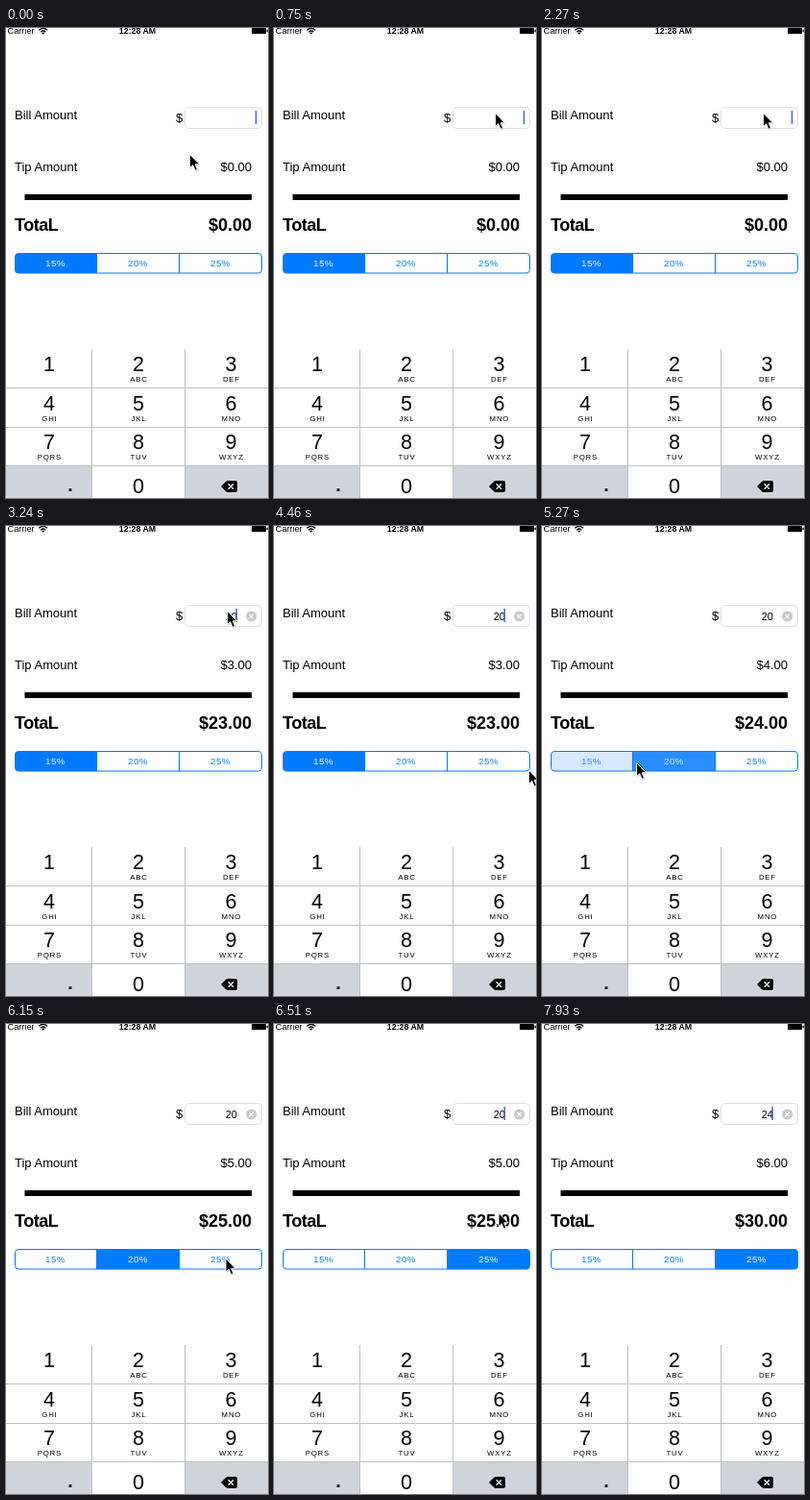
An HTML page that plays this animation: 273x489 px, repeating every 8000 ms.

```html
<!DOCTYPE html>
<html lang="en">
<head>
<meta charset="utf-8">
<title>Tip calculator</title>
<style>
html, body { margin: 0; width: 100%; height: 100%; overflow: hidden; background: #fefefe; }
svg { display: block; width: 273px; height: 489px; font-family: "Liberation Sans", Arial, sans-serif; }
.mid { text-anchor: middle; }
.end { text-anchor: end; }
.bold { font-weight: bold; }
</style>
</head>
<body>
<svg id="stage" viewBox="0 0 273 489" width="273" height="489">
  <rect width="273" height="489" fill="#fefefe"/>

  <g id="status">
    <text x="1.5" y="6.3" font-size="9.2">Carrier</text>
    <g fill="none" stroke="#000" stroke-width="1.3">
      <path d="M34.3 2.3Q38.7 -1.7 43.1 2.3"/>
      <path d="M36.2 4.2Q38.7 1.9 41.2 4.2"/>
    </g>
    <path d="M37.2 5.2Q38.7 4 40.2 5.2L38.7 6.8Z"/>
    <text class="mid bold" x="137" y="6.3" font-size="8.8">12:28 AM</text>
    <rect x="256" y="0" width="15" height="6" rx="0.8"/>
    <rect x="271.5" y="1.7" width="1.3" height="2.6"/>
  </g>

  <g font-size="13">
    <text x="9" y="95">Bill Amount</text>
    <text x="177" y="98">$</text>
    <text x="9" y="149">Tip Amount</text>
    <text id="tip" class="end" x="256" y="149"></text>
  </g>
  <rect x="186.5" y="82.5" width="80" height="22" rx="4" fill="#fff" stroke="#dedede"/>
  <text id="bill" class="end" x="241" y="97.5" font-size="11"></text>
  <rect id="caret" y="86" width="1.6" height="14" fill="#426bf2"/>
  <g id="clear">
    <circle cx="255.6" cy="94" r="5.6" fill="#c8c8cd"/>
    <path d="M253.4 91.8l4.4 4.4m0 -4.4l-4.4 4.4" stroke="#fff" stroke-width="1.1"/>
  </g>
  <rect x="19.5" y="173" width="236.5" height="6"/>
  <g class="bold" font-size="18">
    <text x="9" y="211" letter-spacing="-0.5">TotaL</text>
    <text id="total" class="end" x="256" y="211"></text>
  </g>

  <g id="segments"></g>
  <rect x="9.5" y="234.5" width="257" height="20.5" rx="3.5" fill="none" stroke="#007aff"/>
  <path d="M94.5 234.5V255M180.5 234.5V255" stroke="#007aff"/>

  <g id="keys">
    <path d="M0 456H89V489H0ZM187 456H273V489H187Z" fill="#d0d3da"/>
    <path d="M0 374.5H273M0 415.5H273M0 455.5H273M89.5 334V489M186.5 334V489" stroke="#bfc1c5"/>
    <rect x="65.6" y="479.2" width="2.8" height="2.8"/>
    <path d="M224 477l5 -5q1 -1 2.2 -1h7.8q2 0 2 2v8q0 2 -2 2h-7.8q-1.2 0 -2.2 -1z"/>
    <path d="M231.6 474.3l5.4 5.4m0 -5.4l-5.4 5.4" stroke="#e4e6ea" stroke-width="1.5"/>
  </g>

  <g id="mouse">
    <path d="M0.6 1V15.4L3.9 12.3L6.2 18L9 16.8L6.7 11.3H11Z" fill="#000" opacity="0.18"/>
    <path d="M0 0V14.2L3.2 11.2L5.5 16.8L8 15.7L5.7 10.3H10.1Z" fill="#000" stroke="#fff" stroke-width="1"/>
  </g>
</svg>
<script>
const LOOP = 8000;
const $ = id => document.getElementById(id);
const clamp = v => Math.max(0, Math.min(1, v));
const ramp = (t, from, to) => clamp((t - from) / (to - from));
const mix = (a, b, p) => a + (b - a) * p;
const smooth = p => p * p * (3 - 2 * p);

function add(parent, tag, attrs, text = "") {
  const el = document.createElementNS("http://www.w3.org/2000/svg", tag);
  for (const k in attrs) el.setAttribute(k, attrs[k]);
  el.textContent = text;
  parent.appendChild(el);
  return el;
}

// Keypad labels
const COLS = [45, 138, 234.5];
["", "ABC", "DEF", "GHI", "JKL", "MNO", "PQRS", "TUV", "WXYZ"].forEach((letters, i) => {
  const x = COLS[i % 3], y = 357 + Math.floor(i / 3) * 40.5;
  add($("keys"), "text", { class: "mid", x, y, "font-size": 21.5 }, i + 1);
  add($("keys"), "text", { class: "mid", x: x + 0.4, y: y + 11, "font-size": 7.8, "letter-spacing": 0.8 }, letters);
});
add($("keys"), "text", { class: "mid", x: COLS[1], y: 484, "font-size": 21.5 }, "0");

// Segmented control
const RATES = [15, 20, 25];
const SHAPES = [
  "M94.5 234.5V255H13Q9.5 255 9.5 251.5V238Q9.5 234.5 13 234.5Z",
  "M94.5 234.5H180.5V255H94.5Z",
  "M180.5 234.5H263Q266.5 234.5 266.5 238V251.5Q266.5 255 263 255H180.5Z"
];
const segments = RATES.map((rate, i) => ({
  fill: add($("segments"), "path", { d: SHAPES[i], fill: "#007aff" }),
  label: add($("segments"), "text", {
    class: "mid", x: [51.5, 137.5, 223.5][i], y: 248, "font-size": 9.8, "letter-spacing": 0.5
  }, rate + "%")
}));

// [time, value]
const BILLS = [[0, ""], [2850, "2"], [3240, "20"], [7750, "2"], [7930, "24"]];
const PICKS = [[0, 0], [5120, 1], [6150, 2]];
const FADE = 250;

// [time, x, y]
const PATH = [
  [0, 191.5, 131.5], [90, 191.5, 131.5], [500, 226, 84], [740, 230.5, 88.5],
  [3720, 230.5, 88.5], [3900, 258, 220], [4010, 274, 315],
  [4270, 275, 254], [4460, 265.5, 254], [4960, 98.5, 246.5],
  [5580, 98.5, 246.5], [5970, 229, 244],
  [6330, 229, 244], [6500, 234, 196.5], [LOOP, 234, 196.5]
];
const HIDE_AT = 7750;

const last = (list, t) => list.filter(e => e[0] <= t).pop();

function mouseAt(t) {
  const i = Math.max(1, PATH.findIndex(p => p[0] > t));
  const a = PATH[i - 1], b = PATH[i], p = smooth(ramp(t, a[0], b[0]));
  return [mix(a[1], b[1], p), mix(a[2], b[2], p)];
}

function caretAt(t) {
  if (t < 2850) {
    const off = [[290, 660], [1290, 1770], [2270, 2600]];
    return Math.min(...off.map(([out, back]) =>
      1 - ramp(t, out, out + 170) + ramp(t, back, back + 80)));
  }
  if (t < 3740 || t >= 7750) return 1;
  const u = (t - 3740) % 1000;
  return u < 400 ? 1 - ramp(u, 0, 170) : ramp(u, 495, 570) ** 2;
}

function draw(t) {
  const bill = last(BILLS, t)[1];
  const [start, pick] = last(PICKS, t);
  const tip = Number(bill) * RATES[pick] / 100;
  $("bill").textContent = bill;
  $("tip").textContent = "$" + tip.toFixed(2);
  $("total").textContent = "$" + (Number(bill) + tip).toFixed(2);
  $("clear").setAttribute("opacity", bill ? 1 : 0);
  $("caret").setAttribute("x", bill ? 239.4 : 259.7);
  $("caret").setAttribute("opacity", clamp(caretAt(t)));

  const p = pick ? 1 - (1 - ramp(t, start, start + FADE)) ** 2 : 1;
  segments.forEach(({ fill, label }, i) => {
    const on = i === pick ? p : i === pick - 1 ? 1 - p : 0;
    fill.setAttribute("opacity", on);
    label.setAttribute("fill", `rgb(${mix(0, 255, on)},${mix(122, 255, on)},255)`);
  });

  const [x, y] = mouseAt(t);
  $("mouse").setAttribute("transform", `translate(${x} ${y})`);
  $("mouse").setAttribute("opacity", t < HIDE_AT ? 1 : 0);
}

function tick() {
  draw(performance.now() % LOOP);
  requestAnimationFrame(tick);
}
tick();
</script>
</body>
</html>
```
